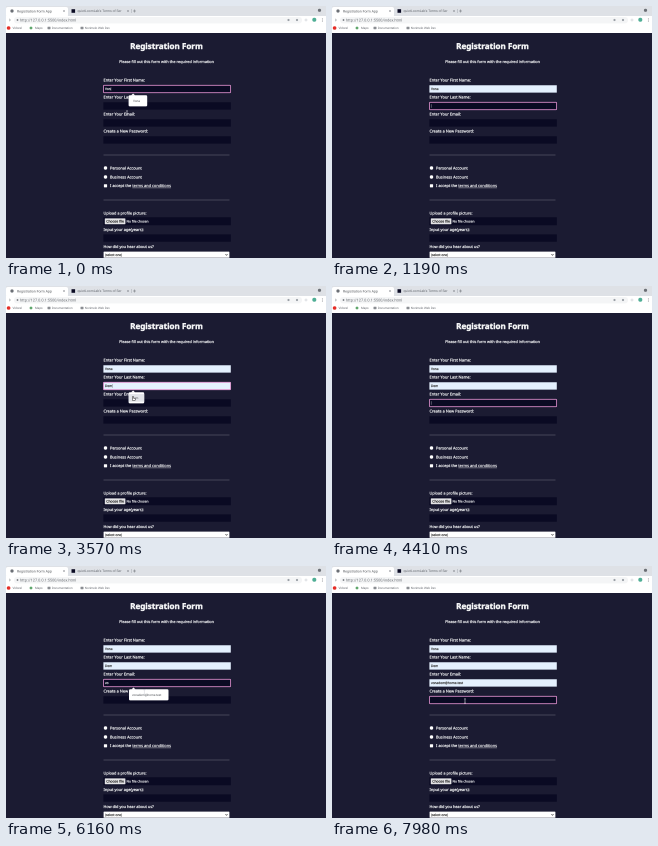
Write an HTML page with a canvas that moves like this. It is 320x252 px and loops after 8000 ms.

```html
<!DOCTYPE html>
<html lang="en">
<head>
<meta charset="utf-8">
<title>Registration Form</title>
<style>
  html, body { margin: 0; width: 100%; height: 100%; overflow: hidden; background: #1b1b32; }
  canvas { display: block; width: 100vw; height: 100vh; }
</style>
</head>
<body>
<canvas id="stage" width="640" height="504"></canvas>
<script>
const ctx = document.getElementById('stage').getContext('2d');
const LOOP = 8000;
const BLINK = 455;
const PAGE = '"Noto Sans", "Open Sans", sans-serif';
const UI = 'Roboto, "Noto Sans", sans-serif';
const WHITE = '#f5f6f7', DARK = '#0a0a23', FILLED = '#e4f0fe', FOCUS = '#d88cc8', GREY = '#6b6f75';

// Each field: typed keys, time of focus, autofill popup and preview, and blur.
const fields = [
  { label: 'Enter Your First Name:', y: 79, focus: 0, blur: 1190, value: 'Vona',
    keys: [[0, 3]], popup: [0, 840], fill: 420, popupX: 122.6, popupW: 18.6, textX: 127 },
  { label: 'Enter Your Last Name:', y: 96, focus: 1190, blur: 4340, value: 'Dem',
    keys: [[2170, 1], [2590, 2]], popup: [2240, 4060], fill: 3290, popupX: 122.6, popupW: 15.6, textX: 126 },
  { label: 'Enter Your Email:', y: 113, focus: 4340, blur: 7490, value: 'vonadem@home.test',
    keys: [[5320, 1], [5460, 2]], popup: [5390, 7000], fill: 6300, popupX: 123, popupW: 39.5, textX: 126 },
  { label: 'Create a New Password:', y: 130, focus: 7490, blur: LOOP, value: '', keys: [], fill: LOOP },
];

// Pointer strokes: lists of [time, x, y].
const strokes = [
  [[0, 121, 107], [70, 121, 107], [420, 128, 96], [910, 128, 96]],
  [[2870, 121, 105], [3290, 127, 112], [4130, 127, 112]],
  [[5810, 127, 118], [6300, 141, 128], [6860, 145, 129], [7000, 145, 129], [7490, 133, 135], [LOOP, 133, 135]],
];

// Page text gets a hairline outline for a slightly heavier weight.
function text(str, x, centerY, size, color = WHITE, font = PAGE, weight = 400, align = 'left') {
  ctx.font = `${weight} ${size}px ${font}`;
  ctx.textRendering = 'geometricPrecision';
  ctx.fillStyle = ctx.strokeStyle = color;
  ctx.textAlign = align;
  ctx.fillText(str, x, centerY + size * 0.36);
  if (font === PAGE) {
    ctx.lineWidth = size * 0.05;
    ctx.strokeText(str, x, centerY + size * 0.36);
  }
  return ctx.measureText(str).width;
}

function rect(x, y, w, h, color, radius = 0) {
  ctx.fillStyle = color;
  ctx.beginPath();
  ctx.roundRect(x, y, w, h, radius);
  ctx.fill();
}

function dot(x, y, r, color) {
  ctx.fillStyle = color;
  ctx.beginPath();
  ctx.arc(x, y, r, 0, 7);
  ctx.fill();
}

function line(color, width, ...points) {
  ctx.strokeStyle = color;
  ctx.lineWidth = width;
  ctx.beginPath();
  points.forEach(([x, y]) => ctx.lineTo(x, y));
  ctx.stroke();
}

function cross(x, y) {
  line(GREY, 0.4, [x - 1, y - 1], [x + 1, y + 1]);
  line(GREY, 0.4, [x + 1, y - 1], [x - 1, y + 1]);
}

function bookmarkFolder(x, name) {
  rect(x, 20.8, 3, 2.4, '#8a8d92', 0.4);
  text(name, x + 4.3, 22, 3.05, GREY, UI);
}

function drawBrowser() {
  rect(0, 0, 320, 10, '#dee1e6');
  rect(0, 10, 320, 17, '#ffffff');
  rect(0, 1, 62, 10, '#ffffff', 2);
  dot(6, 5, 1.6, GREY);
  text('Registration Form App', 11, 5, 3.5, '#55585d', UI);
  cross(58, 5);
  rect(65.5, 3.2, 3.6, 3.6, DARK);
  text("quietLoomLab's Terms of Ser", 71.5, 5, 3.4, GREY, UI);
  cross(122, 5);
  line('#9aa0a6', 0.4, [125.5, 3], [125.5, 7]);
  line(GREY, 0.5, [127, 5], [130, 5]);
  line(GREY, 0.5, [128.5, 3.5], [128.5, 6.5]);
  dot(313.5, 4.3, 1.6, GREY);

  rect(8, 11, 288, 6.4, '#f4f5f6', 3);
  line(GREY, 0.5, [3, 12.8], [4.5, 14], [3, 15.2]);
  dot(11.5, 14, 0.9, GREY);
  text('http://127.0.0.1:5500/index.html', 14, 14, 3.9, GREY, UI);
  dot(282.5, 14, 1.1, '#9aa0a6');
  dot(291, 14, 1.1, '#9aa0a6');
  dot(300, 14, 1.4, '#e3e5e8');
  dot(308.3, 13.8, 2, '#4fae95');
  [12.8, 14, 15.2].forEach(y => dot(316.3, y, 0.4, GREY));

  dot(2.6, 22, 1.8, '#e52d27');
  text('Vidorel', 6.5, 22, 3.05, GREY, UI);
  dot(25, 22, 1.4, '#5fa76c');
  text('Maps', 29, 22, 3.05, GREY, UI);
  bookmarkFolder(41.5, 'Documentation');
  bookmarkFolder(74.5, 'Norimelo Web Dev');
}

function drawPage() {
  rect(0, 27, 320, 225, '#1b1b32');
  text('Registration Form', 160.5, 40.3, 8.05, WHITE, PAGE, 700, 'center');
  text('Please fill out this form with the required information', 160.5, 55.5, 3.8, WHITE, PAGE, 400, 'center');
  [149, 194].forEach(y => line('#545466', 0.7, [97.5, y], [223.5, y]));

  dot(99.5, 162, 1.7, '#ffffff');
  text('Personal Account', 104, 162, 3.9);
  dot(99.5, 171, 1.7, '#ffffff');
  text('Business Account', 104, 171, 3.9);
  rect(97.9, 178.2, 3.2, 3.2, '#ffffff', 0.5);
  const linkX = 104 + text('I accept the ', 104, 179.7, 3.9);
  const linkW = text('terms and conditions', linkX, 179.7, 3.9, '#dfdfe2');
  line('#dfdfe2', 0.4, [linkX, 181.9], [linkX + linkW, 181.9]);

  text('Upload a profile picture:', 97.5, 207, 3.8);
  rect(97.4, 211.3, 127.4, 8, DARK);
  rect(98.8, 212.4, 20.6, 5.8, '#e4e4e6', 0.6);
  text('Choose file', 109.1, 215.3, 3.4, '#222222', PAGE, 400, 'center');
  text('No file chosen', 120.5, 215.3, 3.3);
  text('Input your age(years):', 97.5, 223.8, 3.9);
  rect(97.4, 228.4, 127.4, 7.4, DARK);
  text('How did you hear about us?', 97.5, 240.7, 3.85);
  rect(97.6, 245.6, 125.8, 6.2, '#ffffff', 0.6);
  text('(select one)', 99, 248.8, 3.2, '#333333');
  line('#333333', 0.6, [219.4, 248.2], [220.5, 249.3], [221.6, 248.2]);
}

function drawField(field, t) {
  const { y, value, focus, blur, fill, keys } = field;
  const filled = t >= fill;
  const focused = t >= focus && t < blur;
  const pressed = keys.filter(([time]) => t >= time).pop();
  const typed = filled ? value : value.slice(0, pressed ? pressed[1] : 0);

  text(field.label, 97.5, y - 4.8, 3.95);
  rect(97.4, y + 0.3, 127.4, 7.3, filled ? FILLED : DARK);
  const width = text(typed, 99, y + 4, 3.2, filled ? '#333333' : WHITE);
  if (!focused) return;

  ctx.strokeStyle = FOCUS;
  ctx.lineWidth = 0.85;
  ctx.beginPath();
  ctx.roundRect(97.5, y + 0.3, 127.1, 7.4, 0.6);
  ctx.stroke();
  const sinceInput = t - (pressed ? pressed[0] : focus);
  if (Math.floor(sinceInput / BLINK) % 2 === 0) {
    line(filled ? '#333333' : WHITE, 0.3, [99.2 + width, y + 2.2], [99.2 + width, y + 5.8]);
  }
}

function drawPopup({ popup, popupX: x, popupW, textX, y, value, fill }, t) {
  if (!popup || t < popup[0] || t >= popup[1]) return;
  const top = y + 10.3;
  const hovered = t >= fill;
  rect(x, top, popupW, 11.1, '#ffffff', 1.2);
  ctx.beginPath();
  ctx.moveTo(x + 2.5, top + 0.1);
  ctx.lineTo(x + 4.5, top - 1.8);
  ctx.lineTo(x + 6.5, top + 0.1);
  ctx.fill();
  if (hovered) rect(x, top + 1.8, popupW, 7.6, '#e2e4e8');
  text(value, textX, top + 5.6, 3.1, '#55585d', UI);
}

function pointerAt(t) {
  const stroke = strokes.find(s => t >= s[0][0] && t < s[s.length - 1][0]);
  if (!stroke) return null;
  const i = stroke.findIndex(p => p[0] > t);
  const [t0, x0, y0] = stroke[i - 1], [t1, x1, y1] = stroke[i];
  const k = (t - t0) / (t1 - t0);
  const ease = k * k * (3 - 2 * k);
  return [x0 + (x1 - x0) * ease, y0 + (y1 - y0) * ease];
}

function drawPointer(t) {
  const point = pointerAt(t);
  if (!point) return;
  const [x, y] = point;
  const overPopup = fields.some(f => f.popup && t >= f.fill && t < f.popup[1]);
  if (overPopup) {
    line('#222222', 1.6, [x, y - 1.8], [x, y + 1]);
    rect(x - 0.9, y, 3.4, 2.8, '#222222', 0.9);
    line('#ffffff', 0.7, [x, y - 1.5], [x, y + 1.2]);
    rect(x - 0.4, y + 0.5, 2.4, 1.8, '#ffffff', 0.5);
  } else {
    line('#d8d8de', 0.6, [x, y - 2], [x, y + 2]);
    line('#d8d8de', 0.5, [x - 1, y - 2.1], [x + 1, y - 2.1]);
    line('#d8d8de', 0.5, [x - 1, y + 2.1], [x + 1, y + 2.1]);
  }
  if (t >= 6860 && t < 7000) {
    ctx.strokeStyle = '#33333d';
    ctx.lineWidth = 1;
    ctx.beginPath();
    ctx.arc(x, y, 5, 0, 7);
    ctx.stroke();
  }
}

function render(now) {
  const t = now % LOOP;
  ctx.setTransform(2, 0, 0, 2, 0, 0);
  drawPage();
  drawBrowser();
  fields.forEach(field => drawField(field, t));
  fields.forEach(field => drawPopup(field, t));
  drawPointer(t);
}

ctx.lineJoin = 'round';
const start = performance.now();
function tick() {
  render(performance.now() - start);
  requestAnimationFrame(tick);
}
tick();
</script>
</body>
</html>
```
